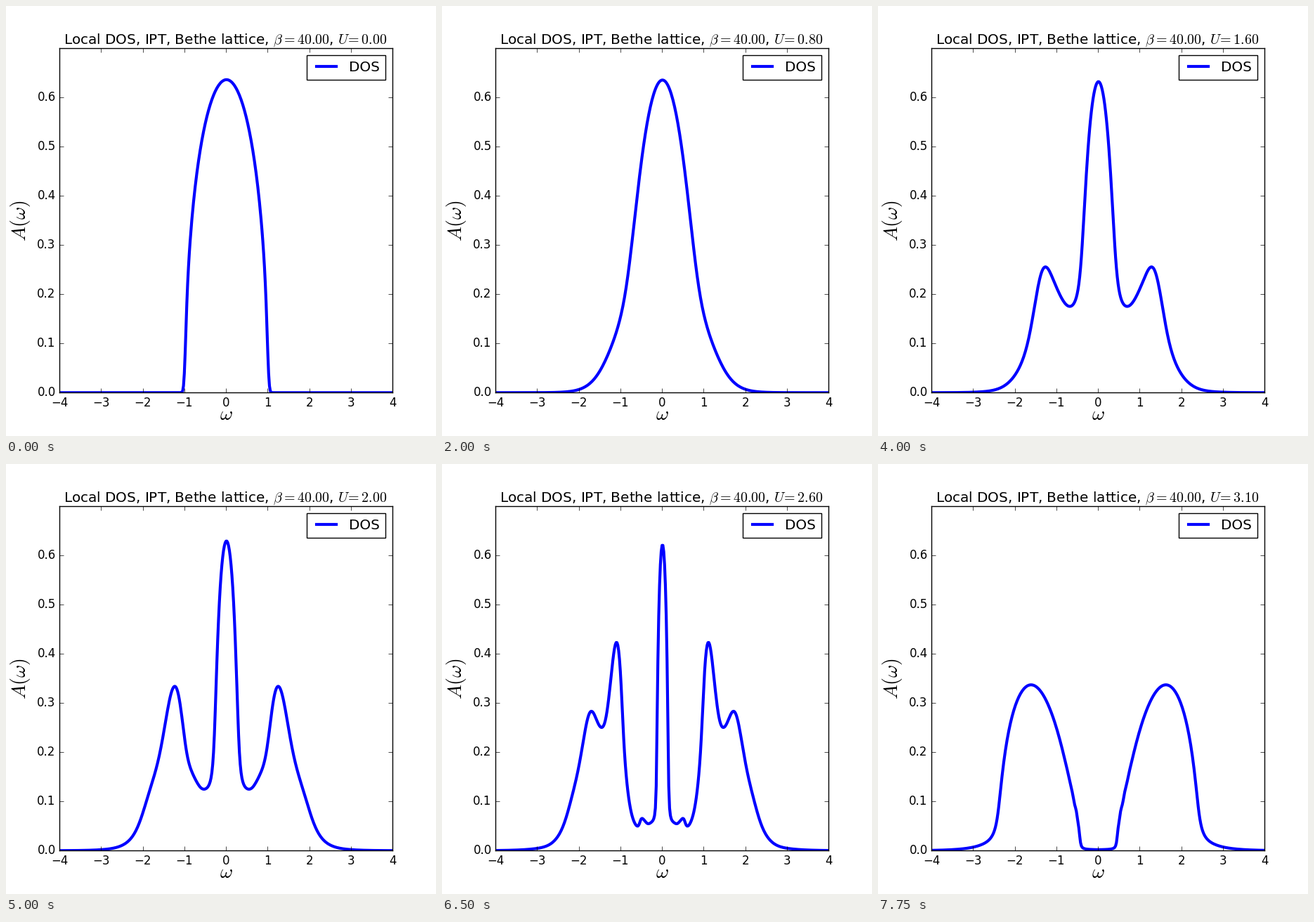
Recreate the animation shown at these times as a matplotlib script. Size 612x612 px, loop 8 s.

```python
"""Local density of states of the Hubbard model on the Bethe lattice.

Every curve is solved with iterated perturbation theory on the real axis.
"""
import numpy as np
import matplotlib.pyplot as plt
from matplotlib.animation import FuncAnimation

SIZE, DPI = 612, 100
LEFT, RIGHT, TOP, BOTTOM = 76.2, 550.2, 60.3, 550.3   # axes edges in pixels
FRAMES, INTERVAL = 32, 250

BETA = 40.0
HOP2 = 0.25           # hopping squared, half bandwidth 1
LOOPS = 30
N = 2 ** 15
DW = 0.001            # frequency step
DT = 2 * np.pi / (N * DW)
ETA = 0.002           # small broadening of the bath

# Frequencies and times in FFT order
w = np.fft.fftfreq(N, 1 / N) * DW
t = np.fft.fftfreq(N, 1 / N) * DT
z = w + 1j * ETA
empty = 0.5 * (1 + np.tanh(BETA * w / 2))


def semicircle(x):
    """Lattice Green's function of the Bethe lattice."""
    return 2 * (x - np.sqrt(x - 1) * np.sqrt(x + 1))


def self_energy(g0, u):
    """Second-order self-energy, using particle-hole symmetry."""
    a = DW * np.fft.fft(-g0.imag / np.pi * empty)
    s = 2 * (a * a * a).real
    s[0] *= 0.5
    s[N // 2:] = 0
    integral = -1j * DT * N * np.fft.ifft(s)
    # Leading end-point correction of the trapezoid rule
    return u ** 2 * (integral + DT ** 2 / 48 * w)


def spectrum(u):
    sigma = np.zeros(N, complex)
    if u > 0:
        for _ in range(LOOPS):
            bath = z - HOP2 * semicircle(z - sigma)
            sigma = self_energy(1 / bath, u)
    dos = -semicircle(w + 1e-6j - sigma).imag / np.pi
    # Round off the sharp band edges at weak coupling
    width = 0.03 * max(0.0, 1 - u / 0.8)
    if width > 0:
        dos = np.fft.ifft(np.fft.fft(dos) * np.exp(-(width * t) ** 2 / 2)).real
    return np.interp(omega, np.fft.fftshift(w), np.fft.fftshift(dos))


omega = np.linspace(-4, 4, 400)
couplings = 0.1 * np.arange(FRAMES)
curves = [spectrum(u) for u in couplings]

plt.style.use("classic")
plt.rcParams.update({
    "font.family": "DejaVu Sans",
    "mathtext.fontset": "cm",
    "savefig.dpi": "figure",
})

fig = plt.figure(figsize=(SIZE / DPI, SIZE / DPI), dpi=DPI, facecolor="white")
ax = fig.add_axes([LEFT / SIZE, 1 - BOTTOM / SIZE,
                   (RIGHT - LEFT) / SIZE, (BOTTOM - TOP) / SIZE])
line, = ax.plot(omega + 0.01, curves[0], color="#0000ff", lw=3, label="DOS")
ax.set_xlim(-4, 4)
ax.set_ylim(0, 0.7)
ax.set_xticks(range(-4, 5))
ax.set_yticks(np.arange(7) / 10)
ax.set_xlabel(r"$\omega$", fontsize=20, labelpad=-5)
ax.set_ylabel(r"$A(\omega)$", fontsize=20)
ax.legend(loc="upper right", handletextpad=0.6)
title = ax.set_title("", x=0.497)


def update(i):
    line.set_ydata(curves[i])
    title.set_text(r"Local DOS, IPT, Bethe lattice, $\beta=%.2f$, $U\!=%.2f$"
                   % (BETA, couplings[i]))
    return line, title


anim = FuncAnimation(fig, update, frames=FRAMES, interval=INTERVAL,
                     repeat=True, repeat_delay=0, blit=False)
plt.show()
```
